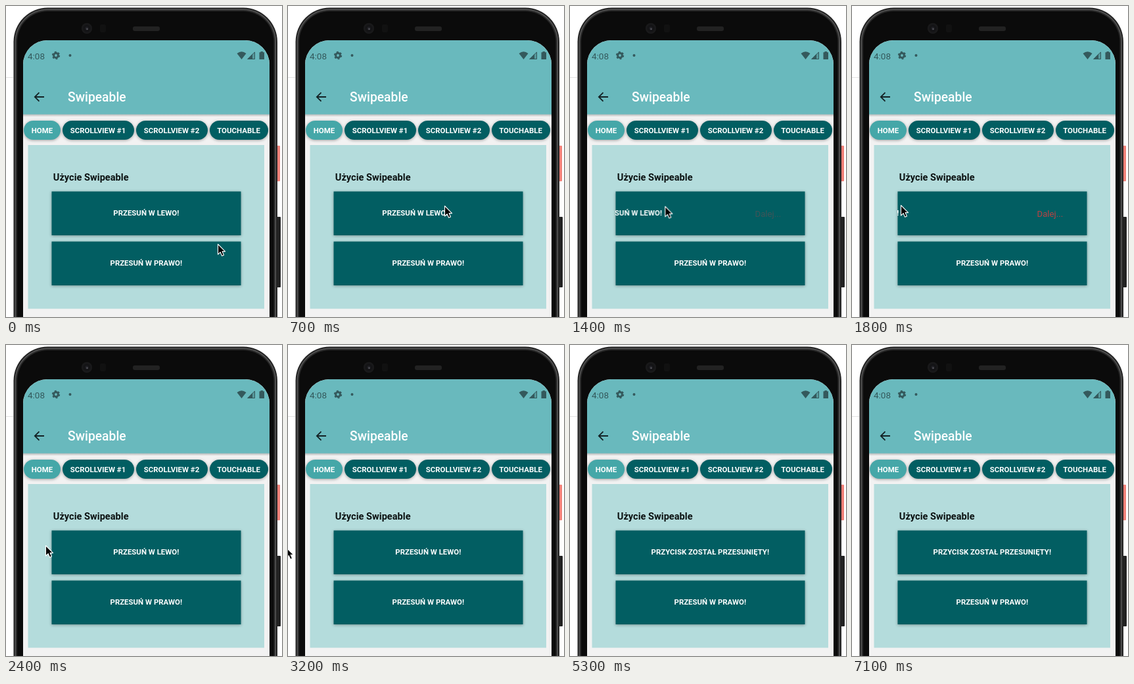
An HTML page for the animation above (7200 ms loop, 420 px wide and 472 px high).

```html
<!DOCTYPE html>
<html lang="pl">
<head>
<meta charset="utf-8">
<title>Swipeable</title>
<style>
html, body { margin: 0; width: 100%; height: 100%; overflow: hidden; background: #fff; }
svg { display: block; width: 420px; height: 472px; font-family: Roboto, sans-serif; }
.btn { font-size: 11.45px; font-weight: 700; fill: #fff; text-anchor: middle; }
.lift { filter: drop-shadow(0 1px 2px rgba(0, 0, 0, .35)); }
.pointer, .label, .hint, .before, .after { animation: 7.2s linear infinite; }
.pointer { animation-name: pointer; }
.label { animation-name: label; }
.hint { animation-name: hint; }
.before { animation-name: before; }
.after { animation-name: after; }

@keyframes pointer {
  0% { transform: translate(322px, 361px); animation-timing-function: steps(5); }
  6.944% { transform: translate(264px, 305px); animation-timing-function: steps(2); }
  9.722% { transform: translate(238px, 303px); animation-timing-function: steps(4); }
  15.277% { transform: translate(197px, 305px); animation-timing-function: steps(7); }
  24.999% { transform: translate(74px, 302px); animation-timing-function: steps(2); }
  27.777%, 33.333% { transform: translate(60px, 304px); animation-timing-function: steps(3); }
  37.499%, 41.666% { transform: translate(8px, 305px); animation-timing-function: steps(2); }
  44.444% { transform: translate(-3px, 307px); animation-timing-function: steps(2); }
  47.222%, 52.777% { transform: translate(-6px, 307px); animation-timing-function: steps(4); }
  58.333%, 100% { transform: translate(-20px, 307px); }
}
@keyframes label {
  0%, 6.944% { transform: translateX(0); animation-timing-function: steps(2); }
  9.722% { transform: translateX(-20px); animation-timing-function: steps(4); }
  15.277% { transform: translateX(-72px); animation-timing-function: steps(7); }
  24.999% { transform: translateX(-192px); animation-timing-function: steps(2); }
  27.777%, 29.166% { transform: translateX(-206px); animation-timing-function: steps(3); }
  33.333%, 100% { transform: translateX(0); }
}
@keyframes hint {
  0%, 16.666% { opacity: 0; animation-timing-function: steps(6); }
  24.999%, 29.166% { opacity: .85; animation-timing-function: steps(3); }
  33.333%, 100% { opacity: 0; }
}
@keyframes before {
  0% { opacity: 1; animation-timing-function: step-end; }
  54.166%, 100% { opacity: 0; }
}
@keyframes after {
  0% { opacity: 0; animation-timing-function: step-end; }
  54.166%, 100% { opacity: 1; }
}
</style>
</head>
<body>
<svg viewBox="0 0 420 472">
  <defs>
    <clipPath id="screen"><rect x="26" y="52" width="375" height="500" rx="37"/></clipPath>
    <clipPath id="button"><rect x="69.500" y="281.500" width="288" height="66.500"/></clipPath>
    <linearGradient id="shade" x2="0" y2="1">
      <stop stop-color="#000" stop-opacity=".22"/>
      <stop offset="1" stop-color="#000" stop-opacity="0"/>
    </linearGradient>
    <radialGradient id="lens">
      <stop stop-color="#2c2c32"/>
      <stop offset=".45" stop-color="#121214"/>
      <stop offset="1" stop-color="#1c1c1d"/>
    </radialGradient>
  </defs>

  <path d="M0 108.5H11" stroke="#e2e2e2"/>

  <!-- phone body -->
  <rect x="411" y="212" width="6" height="54" rx="1" fill="#f08078"/>
  <rect x="411" y="320" width="7" height="107" rx="1" fill="#222"/>
  <rect x="11.500" y="2.500" width="401.500" height="560" rx="52" fill="#222"/>
  <rect x="13.500" y="4.500" width="397.500" height="560" rx="50" fill="#555"/>
  <rect x="15" y="6" width="394.500" height="560" rx="48.500" fill="#2a2a2a"/>
  <rect x="17" y="8" width="390.500" height="560" rx="46.500" fill="#0b0b0b"/>
  <circle cx="123" cy="34" r="8" fill="url(#lens)"/>
  <circle cx="123.500" cy="35" r="1.200" fill="#55555c"/>
  <rect x="143" y="28" width="9" height="12" rx="2" fill="#111"/>
  <rect x="193" y="31" width="41" height="7" rx="3" fill="#222"/>

  <g clip-path="url(#screen)">
    <rect x="26" y="52" width="375" height="420" fill="#f2f2f2"/>
    <rect x="26" y="52" width="375" height="112.500" fill="#69b9bd"/>
    <rect x="26" y="164.500" width="375" height="4" fill="url(#shade)"/>

    <!-- status bar -->
    <g fill="#34595c">
      <text x="33" y="80.500" font-size="13.5">4:08</text>
      <circle cx="76" cy="75" r="3.400" fill="none" stroke="#34595c" stroke-width="3"/>
      <circle cx="76" cy="75" r="5.300" fill="none" stroke="#34595c" stroke-width="1.800" stroke-dasharray="2.775"/>
      <circle cx="97.500" cy="75" r="2"/>
      <path d="M351.500 72Q358.500 66.500 365.500 72L358.500 81Z"/>
      <path d="M379 69V81H367Z" fill-opacity=".35"/>
      <path d="M375 73V81H367Z"/>
      <path d="M378.500 70V80.500H368Z" fill="none" stroke="#34595c"/>
      <path d="M387.500 69H391V70.300H393V81H385.500V70.300H387.500Z"/>
    </g>

    <!-- header -->
    <path d="M58 138H44M50.500 131.300L43.800 138L50.500 144.700" fill="none" stroke="#142326" stroke-width="1.800"/>
    <text x="94" y="145" font-size="19.3" font-weight="500" fill="#fff">Swipeable</text>

    <!-- tabs -->
    <g class="lift" fill="#025e62">
      <rect x="27" y="174" width="56" height="29" rx="14.500" fill="#45a7a8"/>
      <rect x="86" y="174" width="109" height="29" rx="14.500"/>
      <rect x="198" y="174" width="109" height="29" rx="14.500"/>
      <rect x="310" y="174" width="89" height="29" rx="14.500"/>
    </g>
    <g class="btn">
      <text x="55" y="193">HOME</text>
      <text x="140" y="193">SCROLLVIEW #1</text>
      <text x="252" y="193">SCROLLVIEW #2</text>
      <text x="354" y="193">TOUCHABLE</text>
    </g>

    <!-- card -->
    <rect x="33.500" y="211" width="359.500" height="248.500" fill="#b4dcdc"/>
    <text x="71.800" y="265" font-size="14.6" font-weight="700" fill="#0c1212">Użycie Swipeable</text>
    <g class="lift" fill="#025e62">
      <rect x="69.500" y="281.500" width="288" height="66.500"/>
      <rect x="69.500" y="357.500" width="288" height="66.500"/>
    </g>
    <g clip-path="url(#button)">
      <text class="hint" x="281.500" y="320" font-size="13.2" fill="#dc3c3e">Dalej...</text>
      <g class="btn">
        <g class="label"><text class="before" x="213.300" y="318">PRZESUŃ W LEWO!</text></g>
        <text class="after" x="213.300" y="318">PRZYCISK ZOSTAŁ PRZESUNIĘTY!</text>
      </g>
    </g>
    <text class="btn" x="213.300" y="393.500">PRZESUŃ W PRAWO!</text>
  </g>

  <g class="pointer">
    <path d="M.5 .5V16L4.200 12.700L6.600 18.300L9.500 17L7.100 11.600H11.600Z" fill="#000" stroke="#fff" stroke-width="1.100" stroke-linejoin="round"/>
  </g>
</svg>
</body>
</html>
```
